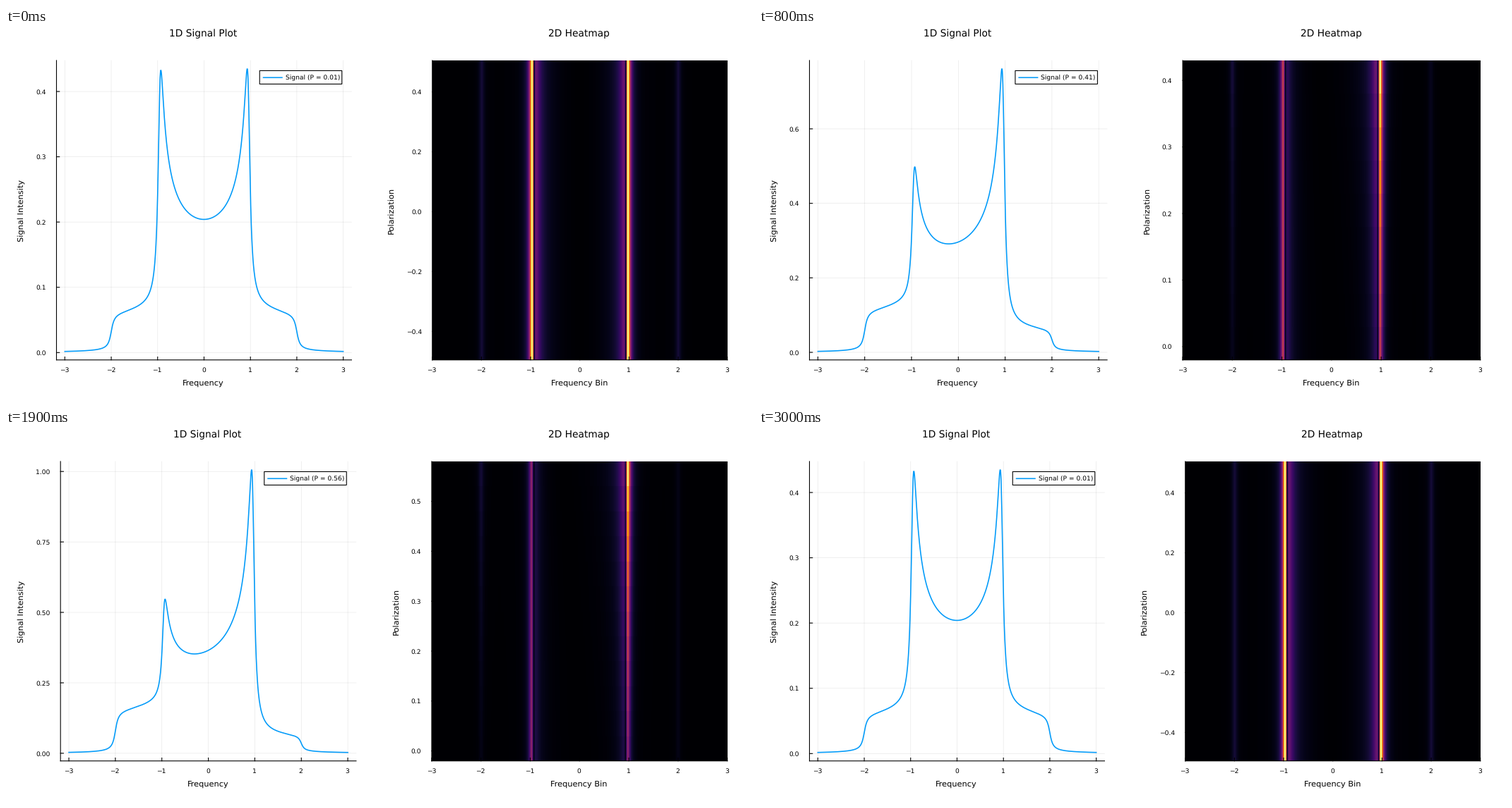
Recreate the animation shown at these times as a matplotlib script. Size 1058x529 px, loop 3100 ms.

```python
import numpy as np
import matplotlib.pyplot as plt
from matplotlib.animation import FuncAnimation
from matplotlib.patches import Rectangle

W, H, DPI = 1058, 529, 64
TOP, BOTTOM, RIGHT = 46, 470.75, 1021.7
PEAK_STEP = 15
FRAMES = 2 * PEAK_STEP + 1
SMALL, MEDIUM, LARGE = 9.14, 11.43, 13.7
DIGIT, MINUS = 5.7, 7.3
BEARING = 0.07
BLUE = "#009af9"

plt.rcParams["font.family"] = "DejaVu Sans"
plt.rcParams["text.hinting"] = "none"


def pt(px):
    return px * 72 / DPI


def branch(x, eps, g=0.05, s=0.04):
    """One transition of a broadened quadrupolar lineshape."""
    y = np.sqrt(3 - s)
    d = 1 - eps * x - s
    q = np.hypot(g, d)
    root = np.sqrt(q)
    cos_half = np.sqrt((1 + d / q) / 2)
    sin_half = np.sqrt((1 - d / q) / 2)
    angle = np.pi / 2 + np.arctan((y**2 - q) / (2 * y * root * sin_half))
    cross = 2 * y * root * cos_half
    log = np.log((y**2 + q + cross) / (y**2 + q - cross))
    return (2 * cos_half * angle + sin_half * log) / (2 * np.pi * root)


X = np.linspace(-3, 3, 1000)
PLUS, MINUS_BRANCH = branch(X, 1) / 10, branch(X, -1) / 10


def polarization(step):
    return (5 + 50 * step) / 1000


def signal(p):
    ratio = (np.sqrt(4 - 3 * p**2) + p) / (2 - 2 * p)
    return ratio * PLUS + MINUS_BRANCH


SIGNALS = [signal(polarization(k)) for k in range(PEAK_STEP + 1)]
SLOPES = np.abs([np.gradient(s, X) for s in SIGNALS])


def nice_ticks(lo, hi):
    """Pick 4 to 8 ticks by granularity, coverage and niceness."""
    span, options = hi - lo, []
    for z in (-3, -2, -1, 0):
        for q, nice in ((1, 1), (5, 0.9), (2, 0.7), (2.5, 0.5), (3, 0.2)):
            step = q * 10.0**z
            first = int(np.ceil(lo / step - 1e-9))
            last = int(np.floor(hi / step + 1e-9))
            n = last - first + 1
            if 4 <= n <= 8:
                score = (0.25 * (1 - abs(n - 5) / 5)
                         + 0.5 * span / ((n - 1) * step) + 0.25 * nice)
                options.append((-round(score, 9), n, step, first))
    _, n, step, first = min(options)
    places = next(d for d in range(1, 5) if abs(round(step, d) - step) < 1e-9)
    return [(first + i) * step for i in range(n)], places


def label(value, places=0):
    return f"{value:.{places}f}".replace("-", "\u2212")


fig = plt.figure(figsize=(W / DPI, H / DPI), dpi=DPI, facecolor="white")
ax = fig.add_axes([0, 0, 1, 1])


def text(x, y, s, px, ha="center", rotation=0):
    # Centre on the advance width, which includes the first side bearing.
    if ha == "center":
        x, y = (x, y + BEARING * px) if rotation else (x - BEARING * px, y)
    ax.text(x, y, s, fontsize=pt(px), ha=ha, va="baseline", color="black",
            rotation=rotation, rotation_mode="anchor", zorder=6)


def line(x, y, px=1.1, color="black", **kw):
    ax.plot(x, y, color=color, lw=pt(px), snap=False, **kw)


def panel(left, right, title, xlabel, ylabel, ylabel_x, xlim, ylim, ticks, places, grid):
    def to_x(v):
        return left + (v + xlim) / (2 * xlim) * (right - left)

    def to_y(v):
        return BOTTOM - (v - ylim[0]) / (ylim[1] - ylim[0]) * (BOTTOM - TOP)

    mid = (left + right) / 2
    text(mid, 11.8, title, LARGE)
    text(mid, 506.6, xlabel, MEDIUM)
    text(ylabel_x, (TOP + BOTTOM) / 2, ylabel, MEDIUM, rotation=90)
    for v in range(-3, 4):
        x = to_x(v)
        text(x, 488, label(v), SMALL)
        line([x, x], [BOTTOM, BOTTOM - 4.2], zorder=5)
        if grid:
            line([x, x], [TOP, BOTTOM], 0.6, alpha=0.1, zorder=1)
    for v in ticks:
        y = to_y(v)
        text(left - 14.7, y + 3.5, label(v, places), SMALL, ha="right")
        line([left, left + 4.2], [y, y], zorder=5)
        if grid:
            line([left, right], [y, y], 0.6, alpha=0.1, zorder=1)
    line([left, left], [TOP, BOTTOM], zorder=5)
    line([left, right], [BOTTOM, BOTTOM], zorder=5)
    return to_x, to_y


def legend(right, p):
    x = right - 130.2
    ax.add_patch(Rectangle((x, 60.5), 116.5, 19, fc="white", ec="black",
                           lw=pt(1.1), snap=False, zorder=5))
    line([x + 4.5, x + 32.5], [70.3, 70.3], 1.6, BLUE, zorder=6,
         solid_capstyle="butt")
    text(x + 36.3, 73.6, f"Signal (P = {p:.2f})", SMALL, ha="left")


def draw(frame):
    ax.clear()
    ax.set(xlim=(0, W), ylim=(H, 0))
    ax.axis("off")
    step = PEAK_STEP - abs(PEAK_STEP - frame)
    p, curve = polarization(step), SIGNALS[step]

    pad = 0.03 * np.ptp(curve)
    ylim = curve.min() - pad, curve.max() + pad
    ticks, places = nice_ticks(*ylim)

    half = 0.025 if step else 0.5
    heat_lim = polarization(0) - half, p + half
    heat_ticks, heat_places = nice_ticks(*heat_lim)

    # Both panels share the width left over by their tick labels.
    left = 71.5 + DIGIT * (places - 1)
    gap = 107 + DIGIT * (heat_places - 1) + MINUS * (heat_ticks[0] < -1e-9)
    width = (RIGHT - left - gap) / 2
    right, heat_left = left + width, RIGHT - width

    to_x, to_y = panel(left, right, "1D Signal Plot", "Frequency",
                       "Signal Intensity", 24.4, 3.18, ylim, ticks, places, True)
    line(to_x(X), to_y(curve), 1.6, BLUE, zorder=4)
    legend(right, p)

    panel(heat_left, RIGHT, "2D Heatmap", "Frequency Bin", "Polarization",
          right + 59.7, 3, heat_lim, heat_ticks, heat_places, False)
    # Whole-pixel edges keep the image from being shifted when drawn.
    ax.imshow(SLOPES[:step + 1], cmap="inferno", origin="lower", aspect="auto",
              extent=(round(heat_left), round(RIGHT), round(BOTTOM), TOP),
              interpolation="nearest", zorder=2)
    return []


anim = FuncAnimation(fig, draw, frames=FRAMES, interval=100, repeat=True,
                     repeat_delay=0, blit=False)
plt.show()
```
